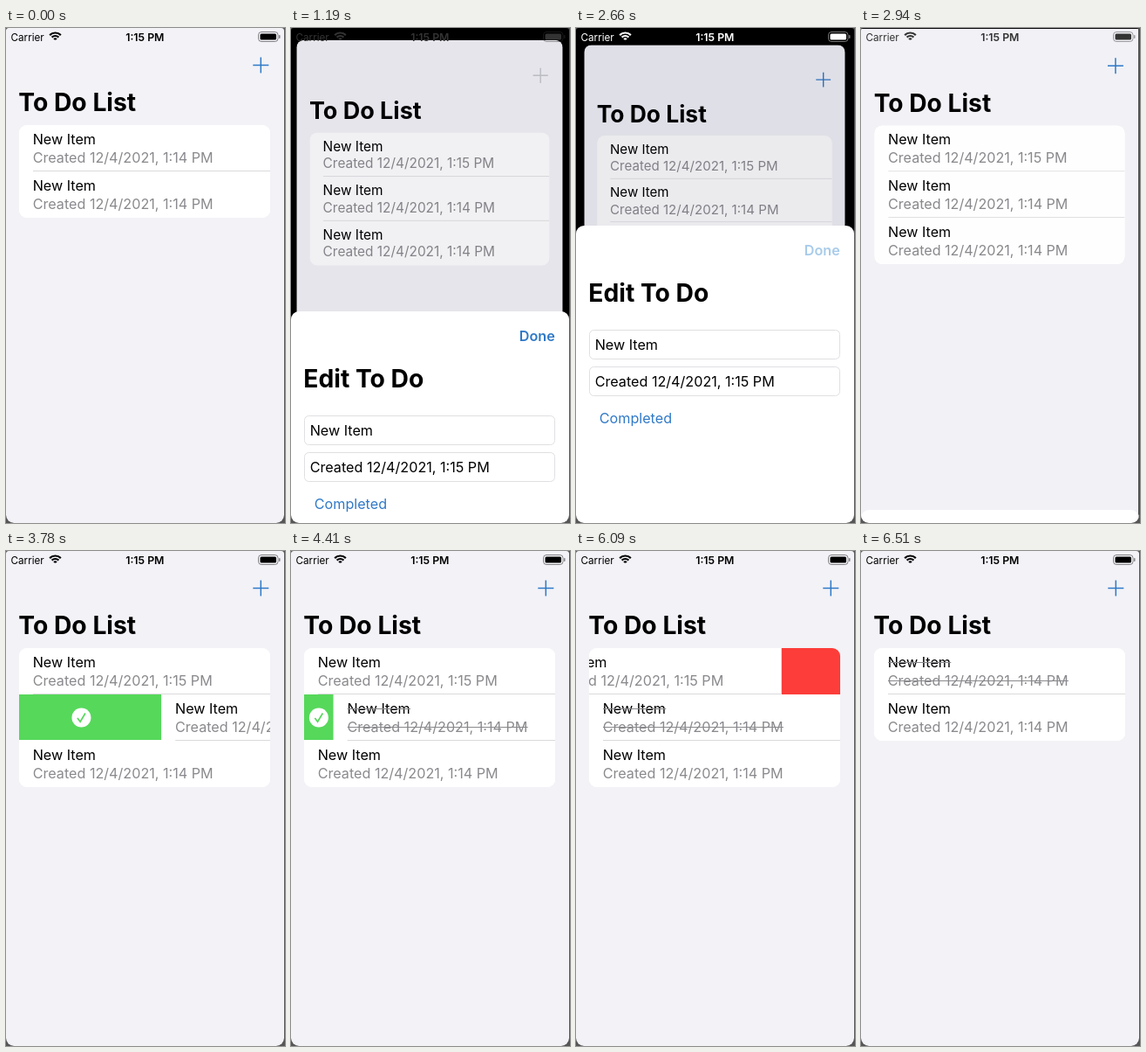
Animation, 320 px wide and 566 px high, one loop 7.28 s. Source, as an HTML page with a canvas:

```html
<!DOCTYPE html>
<html lang="en">
<head>
<meta charset="utf-8">
<title>To Do List</title>
<style>
html, body { margin: 0; height: 100%; overflow: hidden; background: #555; }
canvas { display: block; }
</style>
</head>
<body>
<canvas id="stage" width="320" height="566"></canvas>
<script>
const ctx = document.getElementById('stage').getContext('2d');
const LOOP = 7280, TICK = 70;
const W = 319, H = 566, LEFT = 15, RIGHT = 303, TOP = 111, ROW = 53, SPAN = RIGHT - LEFT;
const OPEN_AT = 1086.5, CLOSE_AT = 2577;
const BODY = 16.15, HEADING = 28.25;
const BLUE = '#2f79c7', GRAY = '#8a8a8e';

const clamp = v => Math.max(0, Math.min(1, v));
const ramp = (t, from, to) => clamp((t - from) / (to - from));

// Critically damped spring from 0 to 1, w in 1/s
function spring(t, start, w) {
  const x = Math.max(0, t - start) / 1000 * w;
  const p = 1 - (1 + x) * Math.exp(-x);
  return p > 0.998 ? 1 : p;
}

function text(str, x, y, size, color, weight = 400, align = 'left') {
  ctx.font = `${weight} ${size}px Inter, Roboto, sans-serif`;
  ctx.textAlign = align;
  ctx.fillStyle = color;
  ctx.fillText(str, x, y);
}

function box(x, y, w, h, r, fill) {
  ctx.beginPath();
  ctx.roundRect(x, y, w, h, r);
  if (fill) {
    ctx.fillStyle = fill;
    ctx.fill();
  }
}

function line(color, width, points) {
  ctx.beginPath();
  points.forEach(([x, y]) => ctx.lineTo(x, y));
  ctx.strokeStyle = color;
  ctx.lineWidth = width;
  ctx.stroke();
}

function statusBar(color) {
  text('Carrier', 5.5, 14.5, 11.7, color);
  text('1:15 PM', 159.3, 14.5, 12.3, color, 600, 'center');
  ctx.strokeStyle = color;
  ctx.lineWidth = 2.2;
  for (const r of [2, 5.5, 9]) {
    ctx.beginPath();
    ctx.arc(56.5, 14.5, r, -Math.PI * 0.75, -Math.PI * 0.25);
    ctx.stroke();
  }
  box(291.5, 6.5, 18.5, 7, 1.5, color);
  ctx.globalAlpha = 0.45;
  box(289.5, 4.5, 22.5, 11, 3.5);
  ctx.lineWidth = 1;
  ctx.stroke();
  box(313, 8, 1.5, 4, 1, color);
  ctx.globalAlpha = 1;
}

function rowText(str, y, color, struck) {
  text(str, 30.7, y, BODY, color);
  if (struck) {
    ctx.fillStyle = GRAY;
    ctx.fillRect(31, Math.round(y - 6), ctx.measureText(str).width, 1);
  }
}

function rowContent(row, y, last) {
  ctx.fillStyle = '#fff';
  ctx.fillRect(LEFT, y, SPAN, ROW);
  rowText('New Item', y + 22, '#000', row.struck);
  rowText(`Created 12/4/2021, ${row.time} PM`, y + 42.5, GRAY, row.struck);
  if (!last) {
    ctx.fillStyle = '#dadadd';
    ctx.fillRect(31, y + ROW - 1, RIGHT - 31, 1);
  }
}

function checkAction(shift, y) {
  ctx.fillStyle = '#56d85b';
  ctx.fillRect(LEFT, y, shift, ROW - 1);
  const near = LEFT + Math.min(shift, 74) / 2;
  const far = LEFT + shift - 37;
  const x = near + (far - near) * ramp(shift, 144, 194);
  const mid = y + 26.5;
  ctx.save();
  ctx.beginPath();
  ctx.rect(LEFT, y, shift, ROW);
  ctx.clip();
  box(x - 11, mid - 11, 22, 22, 11, '#fff');
  line('#56d85b', 1.7, [[x - 4.5, mid + 0.5], [x - 1.3, mid + 4.7], [x + 4.5, mid - 5]]);
  ctx.restore();
}

// Swipe to the right runs the check action, then the row springs back
function checkShift(t) {
  if (t < 3600) return 0;
  const out = 1 - (1 - ramp(t, 3600, 4000)) ** 1.4;
  return SPAN * (out - spring(t, 4000, 9));
}

function listScreen(t, plusColor) {
  ctx.fillStyle = '#f2f2f7';
  ctx.fillRect(-1, 0, W + 1, H);
  line(plusColor, 1.5, [[283.3, 42.5], [301.3, 42.5]]);
  line(plusColor, 1.5, [[292.3, 33.5], [292.3, 51.5]]);
  text('To Do List', 14.3, 95, HEADING, '#000', 700);

  const rows = [
    { time: '1:14', struck: t >= 4000, shift: checkShift(t), height: ROW },
    { time: '1:14', struck: false, shift: 0, height: ROW }
  ];
  if (t >= 980 && t < 6510) {
    const swipe = 1 - (1 - ramp(t, 6060, 6300)) ** 2;
    const fold = ramp(t, 6300, 6510);
    rows.unshift({
      time: '1:15',
      shift: -SPAN * swipe,
      height: ROW * (1 - fold * fold * (3 - 2 * fold))
    });
  }

  const total = rows.reduce((sum, row) => sum + row.height, 0);
  ctx.save();
  box(LEFT, TOP, SPAN, total, 9, '#fff');
  ctx.clip();
  let y = TOP;
  rows.forEach((row, i) => {
    ctx.save();
    ctx.beginPath();
    ctx.rect(LEFT, y, SPAN, row.height);
    ctx.clip();
    if (row.shift > 0) checkAction(row.shift, y);
    if (row.shift < 0) {
      ctx.fillStyle = '#fc3d39';
      ctx.fillRect(RIGHT + row.shift, y, -row.shift, ROW);
    }
    ctx.translate(row.shift, 0);
    rowContent(row, y, i === rows.length - 1);
    ctx.restore();
    y += row.height;
  });
  ctx.restore();
}

function field(str, y) {
  box(15.5, y + 0.5, 287, 33, 5);
  ctx.strokeStyle = '#e0e0e3';
  ctx.lineWidth = 1;
  ctx.stroke();
  text(str, 21.7, y + 23, BODY, '#000');
}

function editSheet(top, pressed) {
  ctx.save();
  ctx.translate(0, top);
  box(0, 0, W, H, 9, '#fff');
  text('Done', 302.7, 34, BODY, pressed ? '#a8cbea' : BLUE, 600, 'right');
  text('Edit To Do', 14.3, 87, HEADING, '#000', 700);
  field('New Item', 119);
  field('Created 12/4/2021, 1:15 PM', 161);
  text('Completed', 26.8, 226, BODY, BLUE);
  ctx.restore();
}

function draw(t) {
  const open = spring(t, OPEN_AT, 15) - spring(t, CLOSE_AT, 15);
  const light = Math.round(255 * (ramp(t, 1120, 1470) - ramp(t, 2660, 3010)));
  const scale = 1 - 0.1 * open;

  ctx.fillStyle = '#555';
  ctx.fillRect(0, 0, 320, H);
  ctx.save();
  box(0, 0, W, H, [3, 3, 9, 9], '#000');
  ctx.clip();

  ctx.save();
  ctx.translate(159 * (1 - scale), 30 * open);
  ctx.scale(scale, scale);
  box(-1, 0, W + 1, H + 60, 9 * clamp(open * 4));
  ctx.clip();
  listScreen(t, t >= OPEN_AT && t < CLOSE_AT ? '#c6c6cb' : BLUE);
  ctx.fillStyle = `rgba(0, 0, 40, ${0.12 * open})`;
  ctx.fillRect(-1, 0, W + 1, H);
  ctx.restore();

  statusBar(`rgb(${light}, ${light}, ${light})`);
  if (open > 0) editSheet(Math.round(H - (H - 40) * open), t >= 2450);
  ctx.restore();
}

const start = performance.now();
function frame() {
  const t = (performance.now() - start) % LOOP;
  draw(Math.floor(t / TICK) * TICK);
  requestAnimationFrame(frame);
}
frame();
</script>
</body>
</html>
```
